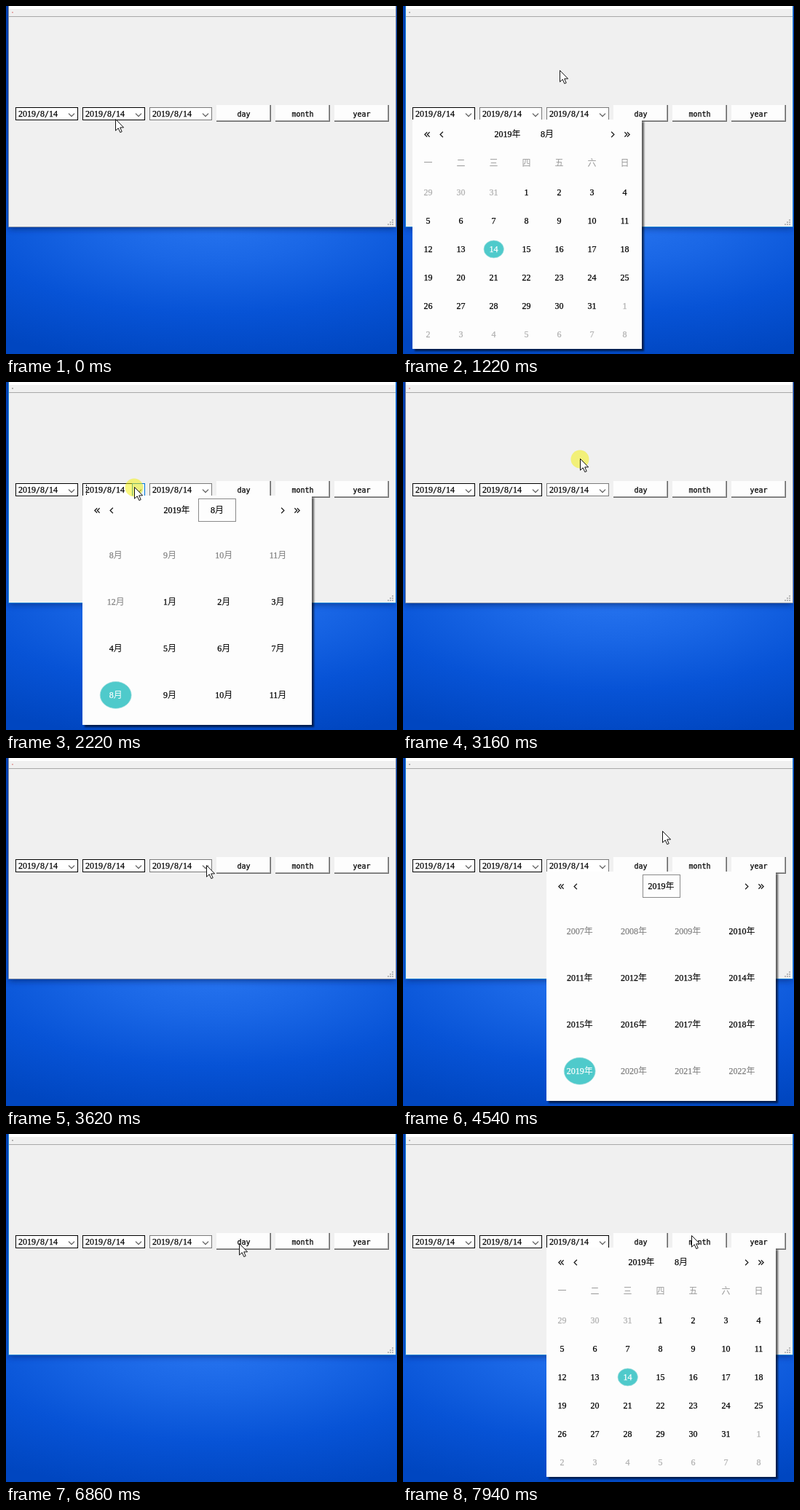
An HTML page for the animation above (8000 ms loop, 537 px wide and 478 px high).

```html
<!DOCTYPE html>
<html lang="zh">
<head>
<meta charset="utf-8">
<title>Date pickers</title>
<style>
  html, body { margin: 0; width: 100%; height: 100%; overflow: hidden; background: #0450d0; }
  svg { display: block; width: 537px; height: 478px; }
  text { font: 10px "DejaVu Sans Mono", monospace; stroke-width: .25px; }
  .digits { font: 12px "Liberation Serif", serif; }
  .cjk { font: 12px "Noto Sans CJK SC", "Noto Sans CJK", sans-serif; stroke: none; }
  .popup { filter: drop-shadow(3px 3px 1.2px rgba(0, 0, 0, .6)); }
</style>
</head>
<body>
<svg id="stage" viewBox="0 0 537 478">
  <defs>
    <radialGradient id="sky" gradientUnits="userSpaceOnUse" cx="0" cy="0" r="1"
      gradientTransform="translate(285 292) scale(520 200)">
      <stop offset="0" stop-color="#2875f0"/>
      <stop offset=".3" stop-color="#1a67e6"/>
      <stop offset=".65" stop-color="#0753d6"/>
      <stop offset="1" stop-color="#0046c0"/>
    </radialGradient>
    <filter id="soft" x="-10%" y="-10%" width="120%" height="120%"><feGaussianBlur stdDeviation="4"/></filter>
  </defs>
</svg>
<script>
const LOOP = 8000, STEP = 77.13;
const stage = document.getElementById('stage');

function add(parent, tag, attrs = {}) {
  const el = document.createElementNS('http://www.w3.org/2000/svg', tag);
  for (const key in attrs) el.setAttribute(key, attrs[key]);
  return parent.appendChild(el);
}
const rect = (p, x, y, width, height, fill, more) => add(p, 'rect', { x, y, width, height, fill, ...more });
const line = (p, d, stroke, width = 1) => add(p, 'path', { d, stroke, 'stroke-width': width, fill: 'none' });
const show = (el, on) => el.setAttribute('visibility', on ? 'visible' : 'hidden');

// Digits, Chinese characters and the rest each have their own font
function label(p, x, y, str, fill = '#000', anchor = 'middle') {
  const el = add(p, 'text', { x, y: y + 4, fill, stroke: fill, 'text-anchor': anchor });
  for (const run of str.match(/\d+|[\u4e00-\u9fff]+|[^\d\u4e00-\u9fff]+/g)) {
    const kind = /\d/.test(run) ? 'digits' : run > '\u4dff' ? 'cjk' : 'plain';
    add(el, 'tspan', { class: kind }).textContent = run;
  }
}

// Desktop and window
rect(stage, 0, 0, 537, 478, 'url(#sky)');
const shade = rect(stage, 4, -20, 531, 326, '#001a60', { filter: 'url(#soft)' });
rect(stage, 4, 0, 531, 303, '#f0f0f0');
rect(stage, 4, 0, 531, 4, '#fff');
line(stage, 'M4 14.5H535', '#a9a9a9');
const edge = line(stage, 'M3.5 0V303.5H535.5V0');
const dot = rect(stage, 8, 8, 2, 1.5);
for (let r = 0; r < 3; r++)
  for (let c = 0; c <= r; c++) rect(stage, 530 - c * 3, 293 + r * 3, 2, 2, '#b8b8b8');

function combo(x) {
  const g = add(stage, 'g', { transform: `translate(${x} 139)` });
  const box = rect(g, .5, .5, 85, 17, '#fff', { stroke: '#000' });
  const hover = rect(g, 68.5, .5, 17, 17, '#e5f1fb', { stroke: '#0078d7' });
  line(g, 'M73 8.7L77 12.7L81 8.7', '#555', 1.2);
  label(g, 4, 9, '2019/8/14', '#000', 'start');
  const caret = line(g, 'M5.5 2V16', '#000');
  caret.setAttribute('stroke-dasharray', '2 1');
  return { box, hover, caret };
}
const combos = [0, 1, 2].map(i => combo(13 + 92 * i));

['day', 'month', 'year'].forEach((name, i) => {
  const x = 289 + 81 * i;
  rect(stage, x, 136, 75, 23, '#696969');
  rect(stage, x, 136, 74, 22, '#a0a0a0');
  rect(stage, x, 136, 73, 21, '#fdfdfd');
  label(stage, x + 37.5, 148, name);
});

// Popups
function popup(x) {
  const g = add(stage, 'g', { transform: `translate(${x} 156)`, class: 'popup' });
  rect(g, 0, 0, 315, 315, '#fdfdfd');
  const chevron = (cx, dir, s) => line(g, `M${cx + dir * s / 2} ${20.5 - s}l${-s * dir} ${s}l${s * dir} ${s}`, '#222', 1.3);
  for (const dir of [1, -1]) {
    const at = d => 157.5 - dir * d;
    chevron(at(117.5), dir, 3.8);
    chevron(at(139), dir, 3.3);
    chevron(at(135.5), dir, 3.3);
  }
  return g;
}
const frame = (g, x) => rect(g, x + .5, 4.5, 51, 31, '#fdfdfd', { stroke: '#8a8a8a' });
const mark = (g, cx, cy, rx, ry) => add(g, 'ellipse', { cx, cy, rx, ry, fill: '#4fcacb', stroke: '#a5dede', 'stroke-width': .7 });

function dayPopup(x) {
  const g = popup(x);
  label(g, 130.5, 20, '2019年');
  label(g, 185, 20, '8月');
  [...'一二三四五六日'].forEach((c, i) => label(g, 21.5 + 45 * i, 60, c, '#999'));
  mark(g, 111.7, 178, 13.7, 12);
  for (let i = 0; i < 42; i++) {
    const day = i < 3 ? 29 + i : (i - 3) % 31 + 1;
    const fill = i === 16 ? '#fff' : i < 3 || i > 33 ? '#b0b0b0' : '#000';
    label(g, 21.5 + 45 * (i % 7), 100 + 39 * Math.floor(i / 7), String(day), fill);
  }
  return g;
}

function gridPopup(x, text, isGray) {
  const g = popup(x), chosen = 12;
  for (let i = 0; i < 16; i++) {
    const cx = 45.7 + 74.3 * (i % 4), cy = 82 + 64 * Math.floor(i / 4);
    if (i === chosen) mark(g, cx, cy, 21.5, 18.5);
    label(g, cx, cy, text(i), i === chosen ? '#fff' : isGray(i) ? '#808080' : '#000');
  }
  return g;
}

const months = gridPopup(105, i => (i + 7) % 12 + 1 + '月', i => i < 5);
frame(months, 159);
label(months, 129.5, 20, '2019年');
label(months, 185, 20, '8月');
const years = gridPopup(197, i => 2007 + i + '年', i => i < 3 || i > 12);
frame(years, 132);
label(years, 157.5, 20, '2019年');

// Each popup with its combo and the steps at which it opens and closes
const visits = [
  { panel: dayPopup(13), box: combos[0], open: 9, close: 19 },
  { panel: months, box: combos[1], open: 28, close: 39 },
  { panel: years, box: combos[2], open: 48, close: 78 },
  { panel: dayPopup(197), box: combos[2], open: 94, close: Infinity }
];
const BUTTON_CLICK = 84;
const clicks = [...visits.slice(0, 3).flatMap(v => [v.open, v.close]), BUTTON_CLICK];

// Pointer
const pointer = add(stage, 'g');
const flash = add(pointer, 'circle', { cx: 0, cy: 1, r: 12.5, fill: '#f3ef00', opacity: .5 });
add(pointer, 'path', {
  d: 'M.5 .5V16.2L4.2 12.8L6.8 18.6L9.2 17.6L6.7 11.9H11.6Z',
  fill: '#fff', stroke: '#111', 'stroke-width': 1, 'stroke-linejoin': 'round'
});

// Stops: arrival step, x, y. A move takes at most MOVE steps.
const MOVE = 7;
const stops = [
  [-1, 150, 155], [7, 90, 147], [12, 97, 151], [15, 215, 88], [26, 176, 144], [36, 238, 98],
  [46, 275, 147], [59, 369, 92], [66, 358, 150], [73, 353, 106], [76, 349, 119],
  [85, 345, 152], [88, 320, 150], [92, 276, 148], [102, 396, 139]
];

function pointAt(k) {
  const i = stops.findIndex(s => s[0] >= k);
  if (i < 0) return stops.at(-1).slice(1);
  const [end, x, y] = stops[i], [prev, px, py] = stops[Math.max(0, i - 1)];
  const left = Math.min(1, (end - k) / Math.min(MOVE, end - prev || 1));
  return [Math.round(x + (px - x) * left), Math.round(y + (py - y) * left)];
}

function draw(t) {
  const k = Math.floor((t - 58) / STEP);
  pointer.setAttribute('transform', `translate(${pointAt(k)})`);
  show(flash, clicks.some(c => k >= c && k < c + 2));

  for (const c of combos) {
    show(c.hover, false);
    show(c.caret, false);
  }
  for (const { panel, box, open, close } of visits) {
    show(panel, k >= open && k < close);
    const since = k - open + 1;
    if (since < 0 || k >= close) continue;
    show(box.hover, since < 4);
    show(box.caret, Math.floor(since / 7) % 2 === 0);
  }
  combos[1].box.setAttribute('stroke', k >= 3 && k < 26 ? '#7a7a7a' : '#000');
  combos[2].box.setAttribute('stroke', k < 91 ? '#7a7a7a' : '#000');

  const active = k >= BUTTON_CLICK || visits.some(v => k >= v.open && k < v.close);
  shade.setAttribute('opacity', active ? .55 : .65);
  edge.setAttribute('stroke', active ? '#1883d7' : '#7f8ca6');
  dot.setAttribute('fill', active ? '#a0a0a0' : '#e39a9a');
}

const start = performance.now();
function tick() {
  draw((performance.now() - start) % LOOP);
  requestAnimationFrame(tick);
}
tick();
</script>
</body>
</html>
```
